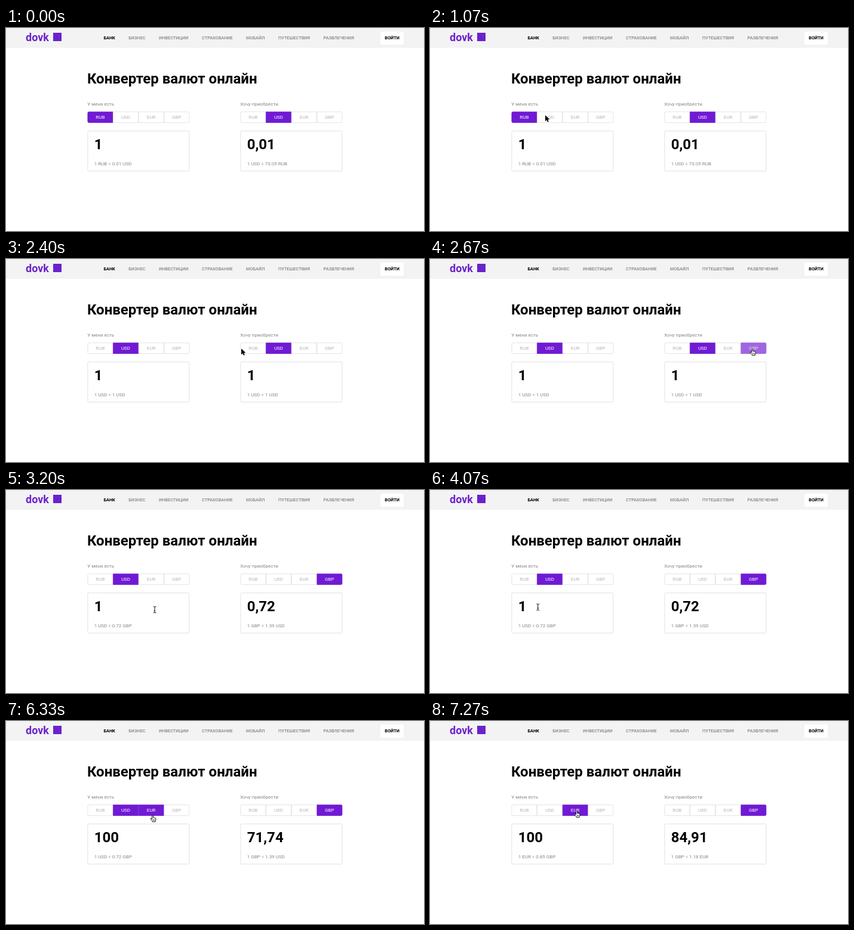
Animation of 700 by 340 pixels, one loop 8 s. Source, as an HTML page with a canvas:

```html
<!DOCTYPE html>
<html lang="ru">
<head>
<meta charset="utf-8">
<title>Конвертер валют</title>
<style>
  html, body { margin: 0; width: 100%; height: 100%; overflow: hidden; background: #fff; }
  canvas { display: block; width: 700px; height: 340px; }
</style>
</head>
<body>
<canvas id="stage"></canvas>
<script>
const W = 700, H = 340, LOOP = 8000, STEPS_PER_MS = 0.015;
const PURPLE = [112, 26, 212], MUTED = [181, 181, 181], WHITE = [255, 255, 255];
const canvas = document.getElementById('stage');
const ctx = canvas.getContext('2d');
const dpr = window.devicePixelRatio || 1;
canvas.width = W * dpr;
canvas.height = H * dpr;

const CODES = ['RUB', 'USD', 'EUR', 'GBP'];
const TAB_W = 42.67, PANEL_W = 170.67;
const NAV = [
  ['БАНК', 163.4], ['БИЗНЕС', 205.2], ['ИНВЕСТИЦИИ', 256], ['СТРАХОВАНИЕ', 328],
  ['МОБАЙЛ', 402], ['ПУТЕШЕСТВИЯ', 456], ['РАЗВЛЕЧЕНИЯ', 531.6]
];

// All times below are in steps of 1/15 s.
const LEFT_AMOUNT = [[0, '1'], [66, '10'], [68, '100']];
const RIGHT_AMOUNT = [[0, '0,01'], [27, '1'], [46, '0,72'], [73, '71,74'], [104, '84,91']];
const LEFT_RATE = [[0, '1 RUB = 0.01 USD'], [27, '1 USD = 1 USD'], [46, '1 USD = 0.72 GBP'], [104, '1 EUR = 0.85 GBP']];
const RIGHT_RATE = [[0, '1 USD = 73.05 RUB'], [27, '1 USD = 1 USD'], [46, '1 GBP = 1.39 USD'], [104, '1 GBP = 1.18 EUR']];

// Pointer stops: step, x, y, shape used from that step on.
const POINTER = [
  [0, 0, 0, null], [9, 262, 296, 'arrow'], [16, 193, 146, 'arrow'], [24, 193, 146, 'hand'],
  [26, 199, 148, 'hand'], [34, 199, 148, 'arrow'], [36, 394, 150, 'arrow'], [39, 536, 152, 'hand'],
  [41, 541, 150, 'hand'], [45, 541, 150, 'arrow'], [47, 310, 188, 'beam'], [48, 249, 200.5, 'beam'],
  [55, 222, 198, 'beam'], [58, 222, 198, 'beam'], [62, 178, 196, 'beam'], [66, 178, 196, null],
  [90, 180, 194, 'beam'], [93, 225, 171, 'hand'], [95, 245.5, 158, 'hand'], [102, 245.5, 150.5, 'hand']
];

const clamp = v => Math.max(0, Math.min(1, v));
const ramp = (t, from, to) => clamp((t - from) / (to - from));
const easeOut = k => 1 - (1 - k) * (1 - k);
const mix = (a, b, k) => `rgb(${a.map((v, i) => Math.round(v + (b[i] - v) * k))})`;
const at = (list, t) => list.filter(item => item[0] <= t).pop()[1];

function text(str, x, y, size, color, weight = 400, align = 'left') {
  ctx.font = `${weight} ${size}px Roboto, sans-serif`;
  ctx.fillStyle = color;
  ctx.textAlign = align;
  ctx.fillText(str, x, y);
}

function box(x, y, w, h, radius, fill, stroke) {
  ctx.beginPath();
  ctx.roundRect(x, y, w, h, radius);
  if (fill) {
    ctx.fillStyle = fill;
    ctx.fill();
  }
  if (stroke) {
    ctx.strokeStyle = stroke;
    ctx.lineWidth = 0.8;
    ctx.stroke();
  }
}

function drawHeader() {
  ctx.fillStyle = '#f3f3f3';
  ctx.fillRect(0, 0, W, 33.3);
  text('dovk', 33, 21.5, 18, '#6b22cc', 700);
  box(79, 8, 14, 14, 0, '#6b22cc');
  NAV.forEach(([label, x], i) => text(label, x, 19.4, 7.33, i ? '#85858c' : '#000', i ? 500 : 700));
  box(627, 6, 39, 22, 2.5, '#fff');
  text('ВОЙТИ', 646.6, 19.4, 7.33, '#000', 700, 'center');
}

function drawPanel(x, label, selected, amount, rate) {
  text(label, x, 130, 8, '#858585');
  CODES.forEach((code, i) => {
    const left = x + 0.3 + i * TAB_W;
    const radius = [i === 0 ? 2 : 0, i === 3 ? 2 : 0, i === 3 ? 2 : 0, i === 0 ? 2 : 0];
    const on = selected[i];
    box(left + 0.4, 140.4, TAB_W - 0.7, 18, radius, mix(WHITE, PURPLE, on), mix([221, 221, 221], PURPLE, on));
    text(code, left + TAB_W / 2, 152.1, 8, mix(MUTED, WHITE, on), 400, 'center');
  });
  box(x + 0.7, 172.4, PANEL_W - 0.7, 67.3, 1.6, '#fff', '#dadada');
  text(rate, x + 11.5, 229.9, 8, '#858585');
  text(amount, x + 11.5, 202.8, 24, '#000', 700);
}

function drawCaret(t, amount) {
  if (!((t >= 63 && t < 75) || (t >= 83 && t < 91))) return;
  ctx.font = '700 24px Roboto, sans-serif';
  ctx.fillStyle = '#000';
  ctx.fillRect(147.7 + ctx.measureText(amount).width, 180.3, 0.9, 28);
}

const SHAPES = {
  arrow() {
    const p = new Path2D('M0 0V10.2L2.4 8L4 11.6L5.8 10.8L4.2 7.3H7.4Z');
    ctx.lineWidth = 1.2;
    ctx.strokeStyle = '#fff';
    ctx.stroke(p);
    ctx.fillStyle = '#000';
    ctx.fill(p);
  },
  hand() {
    const p = new Path2D('M-1 1Q-1 0 0 0T1 1V4Q2 3.4 2.7 4.3Q3.6 3.8 4.2 4.7Q5.6 4.4 5.6 6Q5.6 8 4.6 9.3V10.8H-.4V9.7L-3.4 6.3Q-3.8 5.2-2.6 5.1L-1 6.2Z');
    ctx.fillStyle = '#fff';
    ctx.fill(p);
    ctx.lineWidth = 0.9;
    ctx.strokeStyle = '#000';
    ctx.stroke(p);
    ctx.lineWidth = 0.6;
    ctx.stroke(new Path2D('M.7 6.6V9M2.1 6.6V9M3.5 6.6V9'));
  },
  beam() {
    const p = new Path2D('M-2.4-5.3Q0-5.3 0-4Q0-5.3 2.4-5.3M0-4V4M-2.4 5.3Q0 5.3 0 4Q0 5.3 2.4 5.3M-1.2 1.8H1.2');
    ctx.strokeStyle = '#fff';
    ctx.lineWidth = 2;
    ctx.stroke(p);
    ctx.strokeStyle = '#111';
    ctx.lineWidth = 1;
    ctx.stroke(p);
  }
};

function drawPointer(t) {
  const i = POINTER.findLastIndex(stop => stop[0] <= t);
  const [start, x, y, shape] = POINTER[i];
  if (!shape) return;
  const [end, nx, ny] = POINTER[i + 1] || [start + 1, x, y];
  const k = easeOut(ramp(t, start, end));
  ctx.save();
  ctx.translate(x + (nx - x) * k, y + (ny - y) * k);
  SHAPES[shape]();
  ctx.restore();
}

function draw(ms) {
  const t = Math.floor((ms % LOOP + 4) * STEPS_PER_MS) % (LOOP * STEPS_PER_MS);
  const leftTabs = [1 - ramp(t, 26, 29), ramp(t, 24, 27) - ramp(t, 104, 108), ramp(t, 92, 95), 0];
  const rightTabs = [0, 1 - ramp(t, 45, 48), 0, ramp(t, 38, 41)];
  const amount = at(LEFT_AMOUNT, t);
  ctx.setTransform(dpr, 0, 0, dpr, 0, 0);
  ctx.fillStyle = '#fff';
  ctx.fillRect(0, 0, W, H);
  drawHeader();
  text('Конвертер валют онлайн', 135.9, 92.6, 24, '#000', 700);
  drawPanel(136.2, 'У меня есть', leftTabs, amount, at(LEFT_RATE, t));
  drawPanel(392.2, 'Хочу приобрести', rightTabs, at(RIGHT_AMOUNT, t), at(RIGHT_RATE, t));
  drawCaret(t, amount);
  drawPointer(t);
}

const began = performance.now();
function loop() {
  draw(performance.now() - began);
  requestAnimationFrame(loop);
}
loop();
</script>
</body>
</html>
```
